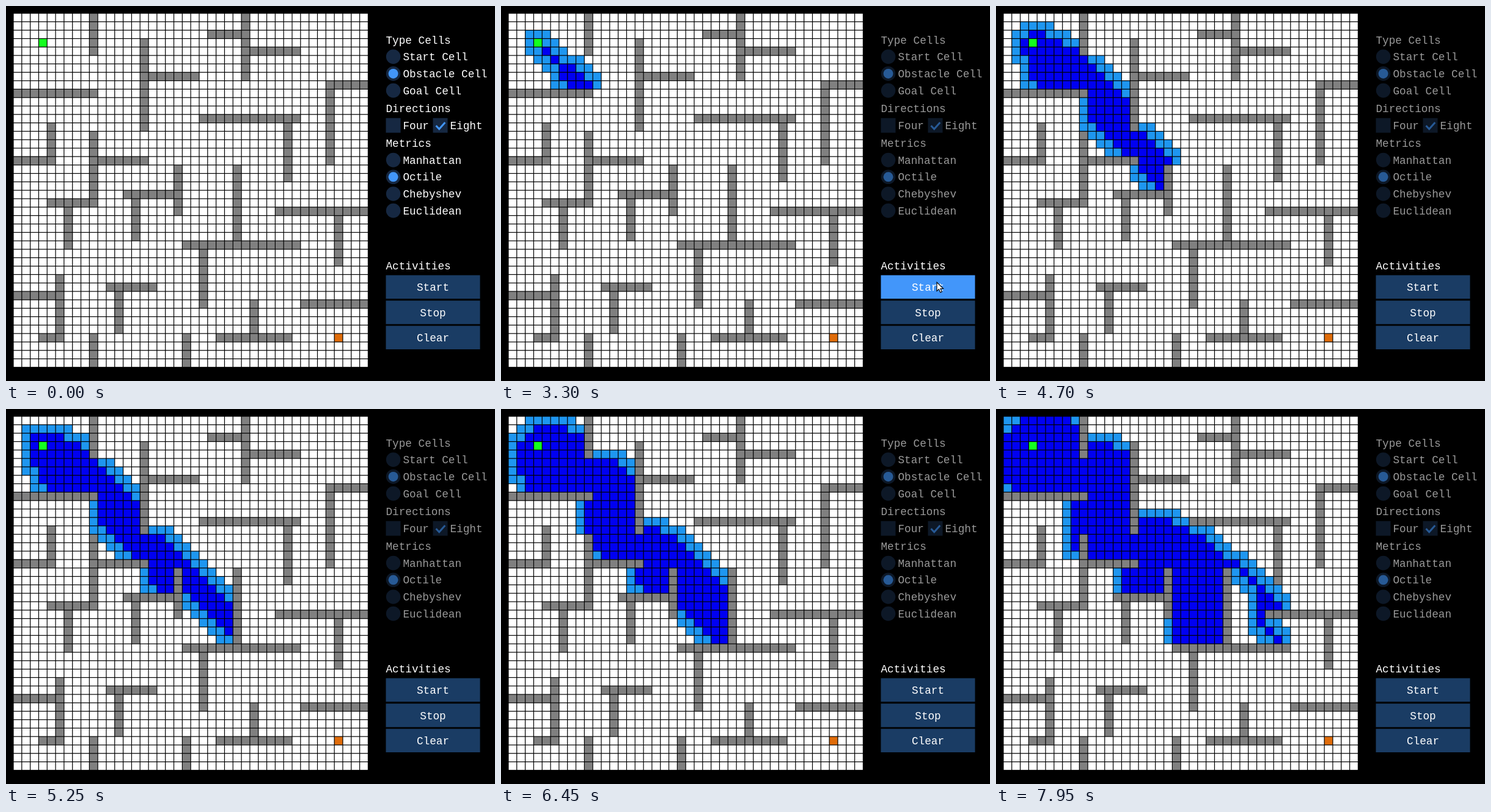
Animation of 800x615 px, one loop 8 s. Source, as an HTML page with a canvas:

```html
<!DOCTYPE html>
<html lang="en">
<head>
<meta charset="utf-8">
<title>Path search</title>
<style>
  html, body { margin: 0; width: 100%; height: 100%; overflow: hidden; background: #000; }
  canvas, svg { position: absolute; left: 0; top: 0; }
  text { font: 17.7px "Liberation Mono", "DejaVu Sans Mono", monospace; fill: #fff; white-space: pre; }
  .frame { fill: #162842; }
  .mark { fill: #4296fa; }
  .button { fill: #1a3c64; }
</style>
</head>
<body>
<canvas id="grid" width="800" height="615"></canvas>
<svg id="panel" width="800" height="615" viewBox="0 0 800 615">
  <g id="options"></g>
  <g id="actions"></g>
  <path id="cursor" d="M0 0V14.5L3.4 11.4L5.8 16.8L8.3 15.7L6 10.5H10.6Z"
    fill="#fff" stroke="#000" stroke-width="1.1"/>
</svg>
<script>
const LOOP = 8000, TICK = 50, SEARCH_START = 3150, STEPS_PER_TICK = 3.011;
const SIZE = 42, ORIGIN = 12, PITCH = 13.82, GAP = 0.6;
const START = { c: 3, r: 3 }, GOAL = { c: 38, r: 38 };
const COLORS = { empty: '#fff', wall: '#808080', open: '#1e96f0', closed: '#0000f2', start: '#14ff1e', goal: '#e06c0a' };

// Vertical walls: column, first row, last row. Horizontal: row, first column, last column.
const V_WALLS = '9 0 4,27 0 7,15 3 13,37 8 17,32 12 19,4 13 17,9 14 22,6 22 27,14 21 26,19 18 23,' +
  '26 18 27,22 27 34,38 23 29,5 31 38,12 32 37,9 38 41,20 38 41,28 34 38';
const H_WALLS = '2 23 27,4 28 33,7 16 21,9 0 9,8 37 41,12 22 33,17 0 4,17 10 15,22 4 9,21 13 19,' +
  '27 20 33,23 31 41,33 0 5,38 3 5,32 11 16,34 34 41,38 24 32';

const index = (c, r) => r * SIZE + c;
const walls = new Set();
function addWalls(spec, toIndex) {
  for (const part of spec.split(',')) {
    const [line, from, to] = part.split(' ').map(Number);
    for (let i = from; i <= to; i++) walls.add(toIndex(line, i));
  }
}
addWalls(V_WALLS, (c, r) => index(c, r));
addWalls(H_WALLS, (r, c) => index(c, r));

function octile(c, r) {
  const dx = Math.abs(GOAL.c - c), dy = Math.abs(GOAL.r - r);
  return Math.max(dx, dy) + (Math.SQRT2 - 1) * Math.min(dx, dy);
}
const isFree = (c, r) => c >= 0 && r >= 0 && c < SIZE && r < SIZE && !walls.has(index(c, r));

// Lowest total first, then the node nearest the goal, then the lower row.
function comesBefore(a, b) {
  const df = a.g + a.h - b.g - b.h, dh = a.h - b.h;
  if (Math.abs(df) > 1e-6) return df < 0;
  if (Math.abs(dh) > 1e-6) return dh < 0;
  return a.r > b.r;
}

// Runs A* and records, per expansion, the closed cell and the cells it opened.
function search(limit) {
  const nodes = new Map(), open = new Set(), steps = [];
  const first = { ...START, g: 0, h: octile(START.c, START.r) };
  nodes.set(index(first.c, first.r), first);
  open.add(first);
  while (open.size && steps.length < limit) {
    let best = null;
    for (const node of open) if (!best || comesBefore(node, best)) best = node;
    open.delete(best);
    const opened = [];
    for (let dr = -1; dr <= 1; dr++) for (let dc = -1; dc <= 1; dc++) {
      if (!dc && !dr) continue;
      const c = best.c + dc, r = best.r + dr, id = index(c, r);
      if (!isFree(c, r) || !isFree(best.c, r) || !isFree(c, best.r)) continue;
      const g = best.g + Math.hypot(dc, dr), known = nodes.get(id);
      if (!known) {
        const node = { c, r, g, h: octile(c, r) };
        nodes.set(id, node);
        open.add(node);
        opened.push(node);
      } else if (open.has(known) && g < known.g - 1e-6) known.g = g;
    }
    steps.push({ closed: best, opened });
  }
  return steps;
}
const steps = search(300);

const ctx = document.getElementById('grid').getContext('2d');
function drawCell(c, r, color) {
  ctx.fillStyle = COLORS.closed;
  const x = ORIGIN + c * PITCH + GAP, y = ORIGIN + r * PITCH + GAP, side = PITCH - 2 * GAP;
  ctx.fillStyle = '#000';
  ctx.fillRect(x - GAP, y - GAP, PITCH, PITCH);
  ctx.fillStyle = color;
  ctx.fillRect(x, y, side, side);
}
function drawGrid(count) {
  const cells = new Map();
  for (const { closed, opened } of steps.slice(0, count)) {
    cells.set(index(closed.c, closed.r), COLORS.closed);
    for (const { c, r } of opened) cells.set(index(c, r), COLORS.open);
  }
  walls.forEach(id => cells.set(id, COLORS.wall));
  cells.set(index(START.c, START.r), COLORS.start);
  cells.set(index(GOAL.c, GOAL.r), COLORS.goal);
  ctx.clearRect(0, 0, 800, 615);
  for (let r = 0; r < SIZE; r++) for (let c = 0; c < SIZE; c++) {
    drawCell(c, r, cells.get(index(c, r)) || COLORS.empty);
  }
}

function add(parent, tag, attrs, content = '') {
  const el = document.createElementNS('http://www.w3.org/2000/svg', tag);
  for (const name in attrs) el.setAttribute(name, attrs[name]);
  el.textContent = content;
  return parent.appendChild(el);
}
const options = document.getElementById('options');
const actions = document.getElementById('actions');
const label = (parent, x, y, content) => add(parent, 'text', { x, y: y + 5.6 }, content);

function radio(y, content, on) {
  add(options, 'circle', { class: 'frame', cx: 633.6, cy: y - 0.4, r: 11.8 });
  if (on) add(options, 'circle', { class: 'mark', cx: 633.6, cy: y - 0.4, r: 8 });
  label(options, 649.5, y, content);
}
function checkbox(x, y, content, on) {
  add(options, 'rect', { class: 'frame', x, y: y - 12.5, width: 24, height: 24 });
  if (on) add(options, 'path', {
    d: `M${x + 5} ${y}l5.2 5.4 9.6 -10.6`, fill: 'none', stroke: '#4296fa', 'stroke-width': 3
  });
  label(options, x + 28, y, content);
}
function button(y, content) {
  const box = add(actions, 'rect', { class: 'button', x: 621.5, y, width: 154, height: 38.5 });
  add(actions, 'text', { x: 698.5, y: y + 25.4, 'text-anchor': 'middle' }, content);
  return box;
}
label(options, 621.5, 56, 'Type Cells');
radio(83.5, 'Start Cell');
radio(111.3, 'Obstacle Cell', true);
radio(139, 'Goal Cell');
label(options, 621.5, 168, 'Directions');
checkbox(621.5, 196.3, 'Four');
checkbox(698.5, 196.3, 'Eight', true);
label(options, 621.5, 225, 'Metrics');
radio(253, 'Manhattan');
radio(280.7, 'Octile', true);
radio(308.4, 'Chebyshev');
radio(336, 'Euclidean');
label(actions, 621.5, 426, 'Activities');
const startButton = button(441.5, 'Start');
button(483.2, 'Stop');
button(524.5, 'Clear');

// Pointer track: time, x, y.
const TRACK = [[2050, 782, 408], [2300, 738, 452], [2450, 718, 468], [2600, 713, 453],
  [3800, 713, 453], [3950, 720, 462], [4300, 773, 460]];
const cursor = document.getElementById('cursor');
function drawPointer(t) {
  const next = TRACK.findIndex(point => point[0] > t);
  const visible = t >= TRACK[0][0] && next > 0;
  cursor.style.display = visible ? '' : 'none';
  let hover = false;
  if (visible) {
    const [t0, x0, y0] = TRACK[next - 1], [t1, x1, y1] = TRACK[next];
    const p = (t - t0) / (t1 - t0), x = x0 + (x1 - x0) * p, y = y0 + (y1 - y0) * p;
    cursor.setAttribute('transform', `translate(${x} ${y})`);
    hover = x < 776 && y > 441;
  }
  const pressed = t >= 2800 && t < 2950;
  startButton.style.fill = pressed ? '#0f87fa' : hover ? '#4296fa' : '';
}

let shown = -1;
function frame() {
  const tick = Math.floor(performance.now() % LOOP / TICK);
  if (tick !== shown) {
    shown = tick;
    const t = tick * TICK, running = t >= SEARCH_START;
    const ticks = (t - SEARCH_START) / TICK + 1;
    drawGrid(running ? Math.floor(ticks * STEPS_PER_TICK - 1) : 0);
    options.setAttribute('opacity', running ? 0.6 : 1);
    drawPointer(t);
  }
  requestAnimationFrame(frame);
}
frame();
</script>
</body>
</html>
```
